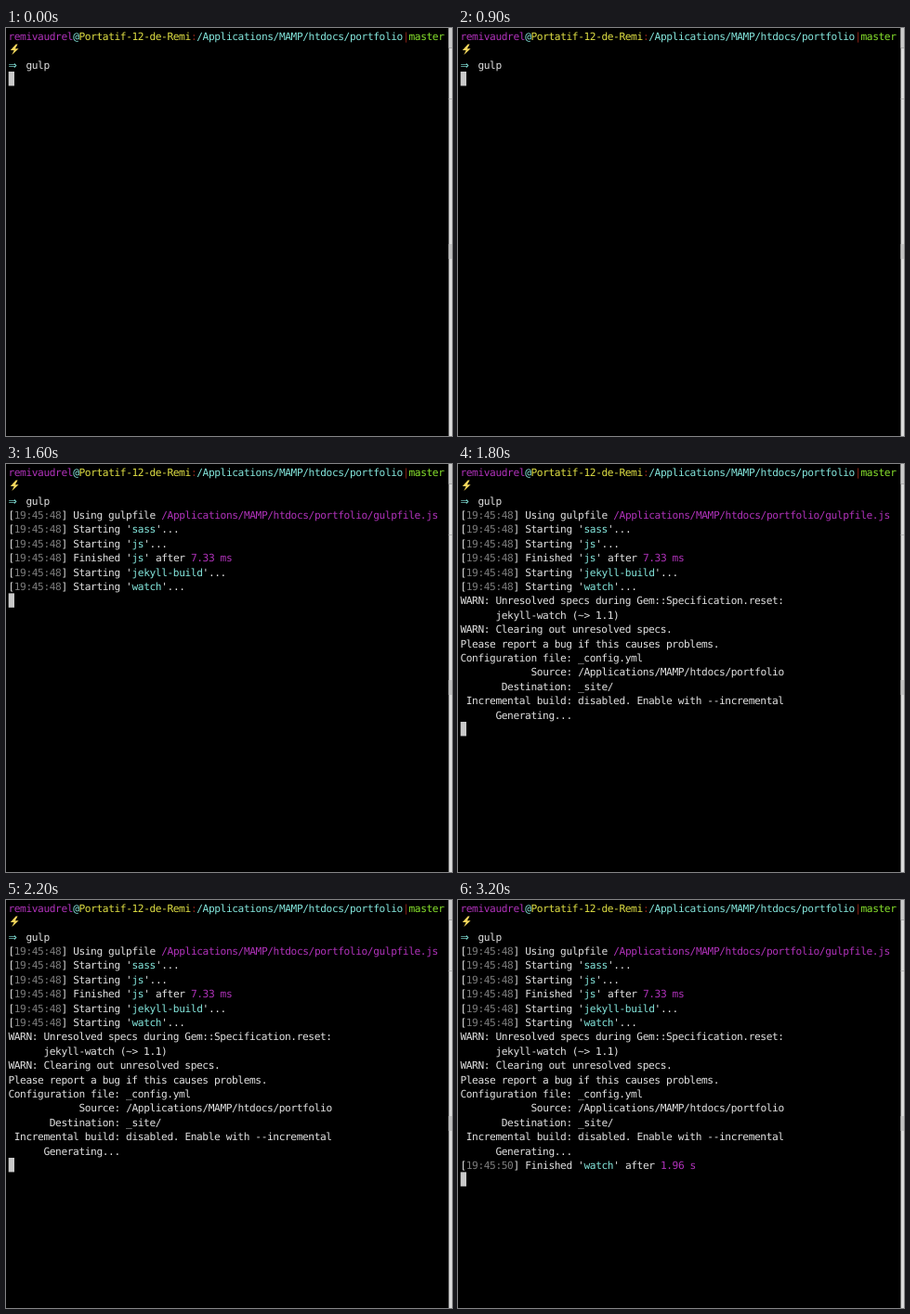
Recreate the animation shown at these times as an HTML page. Size 480 by 440 pixels, loop 3300 ms.

```html
<!DOCTYPE html>
<html lang="en">
<head>
<meta charset="utf-8">
<title>Terminal build</title>
<style>
  html, body { margin: 0; width: 100%; height: 100%; overflow: hidden; background: #000; }
  svg { display: block; width: 480px; height: 440px; }
  text {
    font: 11.2px "DejaVu Sans Mono", "Liberation Mono", monospace;
    letter-spacing: -0.403px;
    text-rendering: geometricPrecision;
    white-space: pre;
  }
  .arrow { font-family: "DejaVu Sans", sans-serif; }
</style>
</head>
<body>
<svg id="stage" viewBox="0 0 480 440" xmlns="http://www.w3.org/2000/svg"></svg>
<script>
const LOOP = 3300;
const LEFT = 2.4, CELL = 6.34, PITCH = 15.4, BASE = 12.8;
const WHITE = '#e2e2e2', GREY = '#7c7c7c', CYAN = '#84e6dc', MAGENTA = '#b032ba',
      YELLOW = '#e0e044', GREEN = '#86e02c', RED = '#8c2418';

const stage = document.getElementById('stage');

function add(name, attrs, text) {
  const node = document.createElementNS('http://www.w3.org/2000/svg', name);
  for (const key in attrs) node.setAttribute(key, attrs[key]);
  if (text) node.textContent = text;
  return stage.appendChild(node);
}

const rect = (x, y, width, height, fill) => add('rect', { x, y, width, height, fill });

// A line is a list of [colour, text] runs, placed on the character grid.
function drawLine(row, runs) {
  let col = 0;
  return runs.map(([fill, text]) => {
    const indent = text.length - text.trimStart().length;
    const node = add('text', {
      x: LEFT + (col + indent) * CELL,
      y: BASE + row * PITCH,
      fill
    }, text.trim());
    col += text.length;
    return node;
  });
}

const plain = text => [[WHITE, text]];
const log = (time, ...runs) => [[WHITE, '['], [GREY, time], [WHITE, '] '], ...runs];
const task = (time, verb, name, tail) =>
  log(time, [WHITE, verb + " '"], [CYAN, name], [WHITE, "'" + tail]);
const start = name => task('19:45:48', 'Starting', name, '...');
const finish = (time, name, took) =>
  [...task(time, 'Finished', name, ' after '), [MAGENTA, took]];

const path = '/Applications/MAMP/htdocs/portfolio';

// Blocks of output and the moment each one is printed.
const blocks = [
  { at: 1000, lines: [
    log('19:45:48', [WHITE, 'Using gulpfile '], [MAGENTA, path + '/gulpfile.js']),
    start('sass'),
    start('js'),
    finish('19:45:48', 'js', '7.33 ms'),
    start('jekyll-build'),
    start('watch')
  ] },
  { at: 1700, lines: [
    plain('WARN: Unresolved specs during Gem::Specification.reset:'),
    plain('      jekyll-watch (~> 1.1)'),
    plain('WARN: Clearing out unresolved specs.'),
    plain('Please report a bug if this causes problems.')
  ] },
  { at: 1800, lines: [
    plain('Configuration file: _config.yml'),
    plain('            Source: ' + path),
    plain('       Destination: _site/'),
    plain(' Incremental build: disabled. Enable with --incremental'),
    plain('      Generating...')
  ] },
  { at: 2900, lines: [finish('19:45:50', 'watch', '1.96 s')] }
];

// Sliver of the window behind the terminal.
rect(0, 0, 480, 440, '#000');
rect(476.5, 0, 3.5, 440, '#dcdcdc');
rect(476.5, 0, 3.5, 21, '#cacaca');
rect(476.5, 21, 3.5, 1, '#aaa');
rect(476.5, 76, 3.5, 1, '#b4b4b4');
rect(476.5, 233, 3.5, 16, '#c2c2c2');

drawLine(0, [
  [MAGENTA, 'remivaudrel'], [CYAN, '@'], [YELLOW, 'Portatif-12-de-Remi'],
  [RED, ':'], [CYAN, path], [RED, '|'], [GREEN, 'master']
]);
add('path', { d: 'M10.6 17.6L4.8 24H8.6L6.4 29L13.6 22.3H9.9L12.6 17.6Z', fill: '#f3d65c' });
add('text', { class: 'arrow', x: LEFT + 0.2, y: BASE + 2 * PITCH, fill: CYAN }, '⇒');
drawLine(2, plain('   gulp'));

const FIRST_ROW = 3;
let nextRow = FIRST_ROW;
for (const block of blocks) {
  block.nodes = block.lines.flatMap(runs => drawLine(nextRow++, runs));
}
const cursor = rect(2.7, 0, 6.3, 15.4, '#c9c9c9');

function render(t) {
  let row = FIRST_ROW;
  for (const block of blocks) {
    const shown = t >= block.at;
    if (shown) row += block.lines.length;
    for (const node of block.nodes) {
      node.setAttribute('visibility', shown ? 'visible' : 'hidden');
    }
  }
  cursor.setAttribute('y', 0.8 + row * PITCH);
}

const began = performance.now();
function tick() {
  render((performance.now() - began) % LOOP);
  requestAnimationFrame(tick);
}
render(0);
requestAnimationFrame(tick);
</script>
</body>
</html>
```
